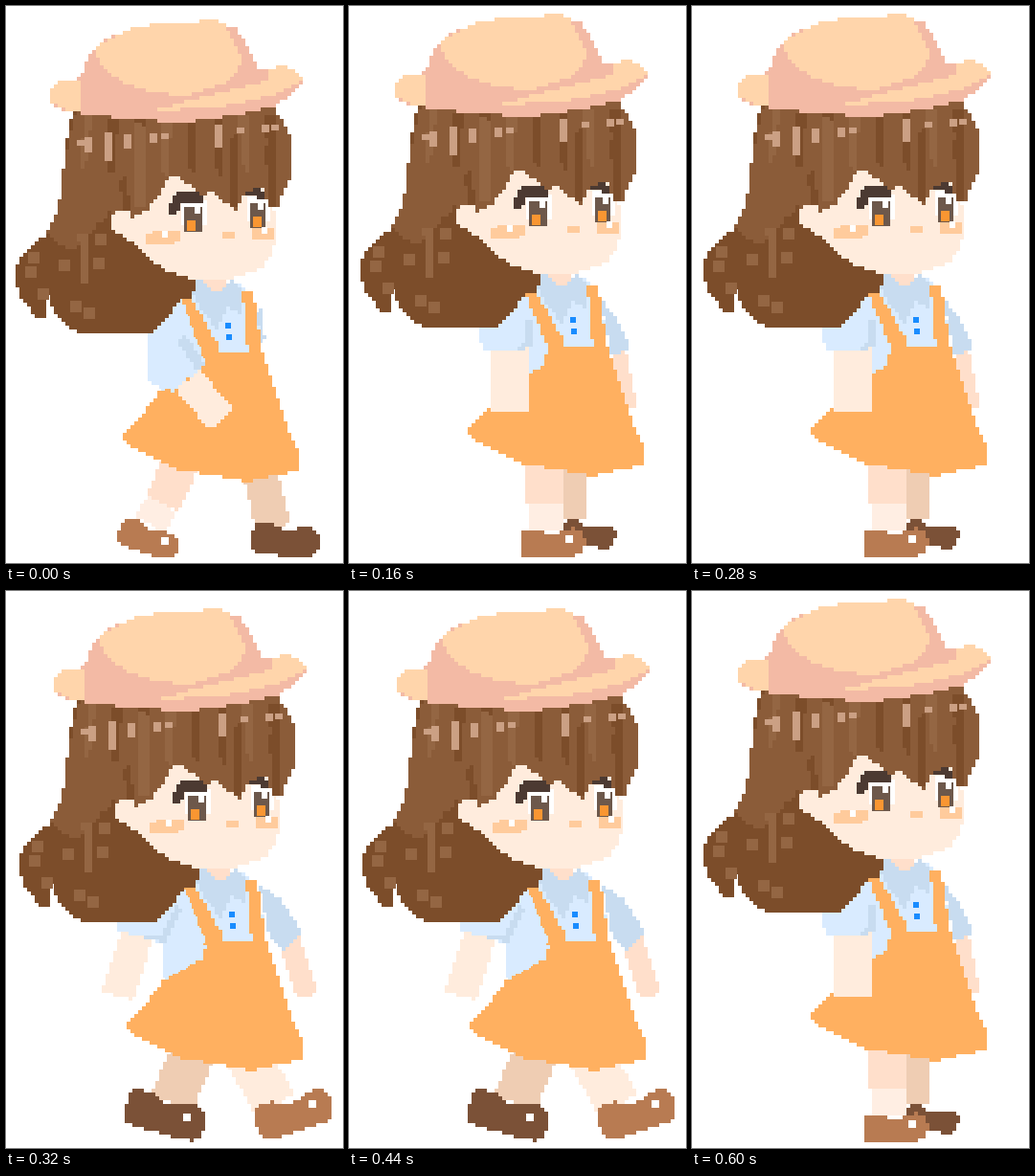
Animation of 352x582 px, one loop 640 ms. Source, as an HTML page with a canvas:

```html
<!DOCTYPE html>
<html>
<head>
<meta charset="utf-8">
<style>
html, body { margin: 0; height: 100%; overflow: hidden; background: #fff; }
canvas { display: block; }
</style>
</head>
<body>
<canvas id="stage" width="352" height="582"></canvas>
<script>
const W = 352, H = 582, CELL = 4;
const SKIN = '#ffecdd', SHADE = '#ffdfcb', BACK = '#efcdb3', SOCK = '#ffeee3',
  BLUE = '#d9ebff', BLUE2 = '#c8dcf0', ORANGE = '#ffb060', STRAW = '#ffd5ab', PINK = '#f3baa5',
  HAIR = '#8b5c39', DARK = '#7c4d2a', LIGHT = '#946643', SHINE = '#cba084', LASH = '#4c3a32',
  IRIS = '#6d584b', BLUSH = '#ffcb9c', SHOE = '#b87b52', SHOE2 = '#7b5137', AMBER = '#f99632';
let g;

const snap = v => Math.round(v / CELL) * CELL;

// Fills a polygon in square steps, without smoothing.
function poly(color, ...p) {
  g.fillStyle = color;
  for (let y = 0; y < H; y += CELL) {
    const mid = y + CELL / 2, xs = [];
    for (let i = 0; i < p.length; i += 2) {
      const j = (i + 2) % p.length, y1 = p[i + 1], y2 = p[j + 1];
      if (y1 <= mid !== y2 <= mid) xs.push(p[i] + (mid - y1) / (y2 - y1) * (p[j] - p[i]));
    }
    xs.sort((a, b) => a - b);
    for (let i = 0; i < xs.length; i += 2) {
      const x = snap(xs[i]);
      g.fillRect(x, y, snap(xs[i + 1]) - x, CELL);
    }
  }
}

// Closed spline through a few key points.
function blob(color, ...p) {
  const n = p.length, out = [], tension = 0.35;
  for (let i = 0; i < n; i += 2) {
    for (let t = 0; t < 1; t += 0.125) {
      for (const k of [i, i + 1]) {
        const a = p[(k + n - 2) % n], b = p[k], c = p[(k + 2) % n], d = p[(k + 4) % n];
        const m = tension * (c - a), q = tension * (d - b);
        out.push(b + m * t + (3 * (c - b) - 2 * m - q) * t * t + (2 * (b - c) + m + q) * t ** 3);
      }
    }
  }
  poly(color, ...out);
}

function box(color, x, y, w, h) {
  g.fillStyle = color;
  g.fillRect(x, y, w, h);
}

// Straight bar of even width between two points.
function limb(color, x1, y1, x2, y2, width) {
  const k = width / 2 / Math.hypot(x2 - x1, y2 - y1), nx = (y1 - y2) * k, ny = (x2 - x1) * k;
  poly(color, x1 + nx, y1 + ny, x2 + nx, y2 + ny, x2 - nx, y2 - ny, x1 - nx, y1 - ny);
}

function shoe(color, x, y, length, tilt, buckle) {
  const c = Math.cos(tilt) * length, s = Math.sin(tilt) * length;
  const at = (u, v) => [x + u * c - v * s, y + u * s + v * c];
  blob(color, ...at(-.48, -.18), ...at(-.25, -.23), ...at(0, -.14), ...at(.35, -.22), ...at(.5, -.08),
    ...at(.46, .18), ...at(.2, .23), ...at(-.42, .22), ...at(-.5, .08));
  if (buckle) box('#fff', ...at(.26, -.05).map(v => Math.round(v) - 4), 8, 8);
}

function eye(x, y, w) {
  box('#fff', x, y - 10, w + 8, 26);
  box(IRIS, x + 3, y - 3, w, 26);
  box('#fff', x + w - 5, y - 3, 6, 7);
  box(AMBER, x + 6, y + 11, 9, 11);
}

function head() {
  blob(DARK, 80,95, 63,160, 57,203, 45,231, 21,252, 10,276, 20,302, 38,322, 46,312, 43,292, 56,318,
    74,334, 110,336, 155,335, 183,303, 199,285, 190,110);
  blob(HAIR, 80,95, 63,160, 57,203, 46,231, 70,248, 95,225, 118,195, 130,100);
  const patches = [28,272, 41,295, 31,257, 63,265, 75,308, 89,315, 101,238, 99,263];
  for (let i = 0; i < patches.length; i += 2) box(LIGHT, patches[i] - 6, patches[i + 1] - 6, 12, 12);
  limb(LIGHT, 82, 232, 85, 285, 9);

  blob(SKIN, 110,214, 118,203, 131,206, 160,165, 270,165, 282,210, 283,240, 269,267, 222,282, 170,271,
    131,239, 115,229);
  eye(185, 207, 19);
  eye(254, 203, 16);
  poly(LASH, 172,212, 175,194, 184,187, 208,190, 208,199, 184,200, 180,212);
  poly(LASH, 250,187, 268,181, 272,199, 262,193, 250,194);
  box(BLUSH, 148, 232, 30, 11);
  box(BLUSH, 155, 229, 29, 11);
  box(BLUSH, 259, 226, 23, 12);
  box(BLUSH, 228, 230, 13, 7);
  box('#fff', 165, 229, 6, 7);
  box('#fff', 269, 225, 6, 7);
  fringe();
  hat();
}

function fringe() {
  poly(HAIR, 78,100, 281,98, 295,122, 302,140, 301,168, 290,192, 286,206, 277,205, 270,184, 252,188,
    242,208, 216,187, 211,194, 186,175, 173,170, 165,186, 150,207, 134,215, 131,205, 111,211, 100,160);
  // tapering locks that lean outwards from the crown
  for (let i = 0; i < 8; i++) {
    const x = 88 + i * 27, end = x + (x - 190) * 0.06, w = 4 + i * 5 % 4;
    poly(i % 3 ? DARK : LIGHT, x - w, 110, x + w, 110, end + 3, 165 + i * 7 % 13, end - 3, 165);
  }
  limb(LIGHT, 142, 118, 141, 205, 14);
  limb(DARK, 124, 174, 128, 206, 7);
  limb(DARK, 238, 130, 242, 205, 8);
  limb(DARK, 276, 140, 282, 203, 8);
  // shine along a sloping band
  const shine = [80,6, 88,16, 109,30, 129,15, 156,10, 168,6, 224,24, 247,6, 273,8, 283,6];
  for (let i = 0; i < shine.length; i += 2) {
    const x = shine[i], h = shine[i + 1];
    box(SHINE, x - 4, Math.round(142 - x * 0.08 - h / 4), 8, h);
  }
}

function hat() {
  blob(PINK, 48,86, 64,73, 79,68, 97,35, 140,16, 205,10, 242,18, 262,52, 268,62, 295,57, 311,72, 285,97,
    235,109, 188,115, 130,112, 72,105, 52,97);
  blob(STRAW, 97,37, 140,16, 205,10, 230,13, 247,50, 235,72, 188,87, 140,80, 106,62);
  blob(STRAW, 160,103, 205,90, 270,73, 278,60, 295,57, 311,70, 280,87, 230,98);
  poly(STRAW, 48,81, 56,73, 78,72, 78,105, 58,101, 48,93);
}

function torso() {
  poly(BLUE, 185,290, 245,282, 264,310, 270,360, 207,380, 163,398, 165,330);
  poly(BLUE2, 190,284, 206,281, 222,294, 240,280, 251,292, 249,316, 234,308, 222,332, 206,312);
  poly(SHADE, 205,276, 234,276, 228,291, 215,291);
  poly(ORANGE, 181,293, 192,293, 222,346, 224,362, 207,362);
  poly(ORANGE, 249,293, 260,293, 270,357, 255,357);
  poly(ORANGE, 222,357, 270,355, 296,435, 309,463, 307,479, 255,491, 180,478, 128,452, 124,442, 143,423,
    163,396, 205,373, 207,357);
  box('#198cff', 231, 325, 6, 6);
  box('#198cff', 232, 337, 6, 6);
}

const forward = {
  dx: -2, dy: 6,
  back() {
    limb(BLUE2, 264, 318, 267, 350, 7);
    limb(BACK, 264, 480, 279, 545, 36);
    shoe(SHOE2, 292, 558, 70, 0.06);
    limb(SHADE, 186, 470, 163, 520, 38);
    limb(SOCK, 163, 520, 150, 542, 35);
    shoe(SHOE, 149, 557, 64, 0.33, true);
  },
  front() {
    limb(SKIN, 190, 390, 225, 433, 33);
    poly(BLUE, 148,342, 160,318, 183,301, 190,325, 208,373, 176,403, 150,394);
    poly(BLUE2, 178,350, 186,342, 208,373, 200,381);
  }
};

const stand = {
  dx: 0, dy: 0,
  back() {
    limb(SHADE, 280, 355, 293, 420, 16);
    poly(BLUE2, 262,303, 280,328, 292,350, 291,360, 274,366);
    limb(BACK, 236, 480, 236, 538, 24);
    limb(SHADE, 204, 475, 204, 520, 40);
    limb(SOCK, 206, 520, 206, 550, 37);
    shoe(SHOE2, 250, 552, 56, 0.12);
    shoe(SHOE, 213, 561, 66, -0.06, true);
  },
  front() {
    limb(SKIN, 167, 350, 169, 424, 38);
    poly(BLUE, 135,336, 150,333, 162,315, 183,299, 207,355, 205,373, 187,386, 186,357, 140,361);
    poly(BLUE2, 184,325, 190,330, 192,356, 172,360, 185,350);
  }
};

const backward = {
  dx: 2, dy: 10,
  back() {
    limb(SHADE, 295, 362, 315, 423, 22);
    poly(BLUE2, 264,308, 285,320, 310,357, 288,376, 275,360);
    limb(BACK, 196, 480, 173, 535, 46);
    shoe(SHOE2, 167, 548, 84, 0.28, true);
    limb(SKIN, 252, 485, 281, 537, 46);
    shoe(SHOE, 301, 546, 82, -0.3, true);
  },
  front() {
    limb(SKIN, 139, 352, 117, 423, 34);
    poly(BLUE, 116,344, 155,343, 165,325, 183,305, 208,365, 187,395, 166,403, 165,368, 118,355);
    poly(BLUE2, 178,328, 183,332, 167,368, 140,361, 161,360);
  }
};

function render(pose) {
  const c = document.createElement('canvas');
  c.width = W;
  c.height = H;
  g = c.getContext('2d');
  const shifted = draw => {
    g.save();
    g.translate(pose.dx, pose.dy);
    draw();
    g.restore();
  };
  box('#fff', 0, 0, W, H);
  pose.back();
  shifted(torso);
  pose.front();
  shifted(head);
  return c;
}

const [a, b, c] = [forward, stand, backward].map(render);
const cycle = [a, b, c, b];
const screen = document.getElementById('stage').getContext('2d');
const start = performance.now();

function tick() {
  const t = (performance.now() - start) % 640;
  screen.drawImage(cycle[Math.floor(t / 160)], 0, 0);
  requestAnimationFrame(tick);
}
tick();
</script>
</body>
</html>
```
